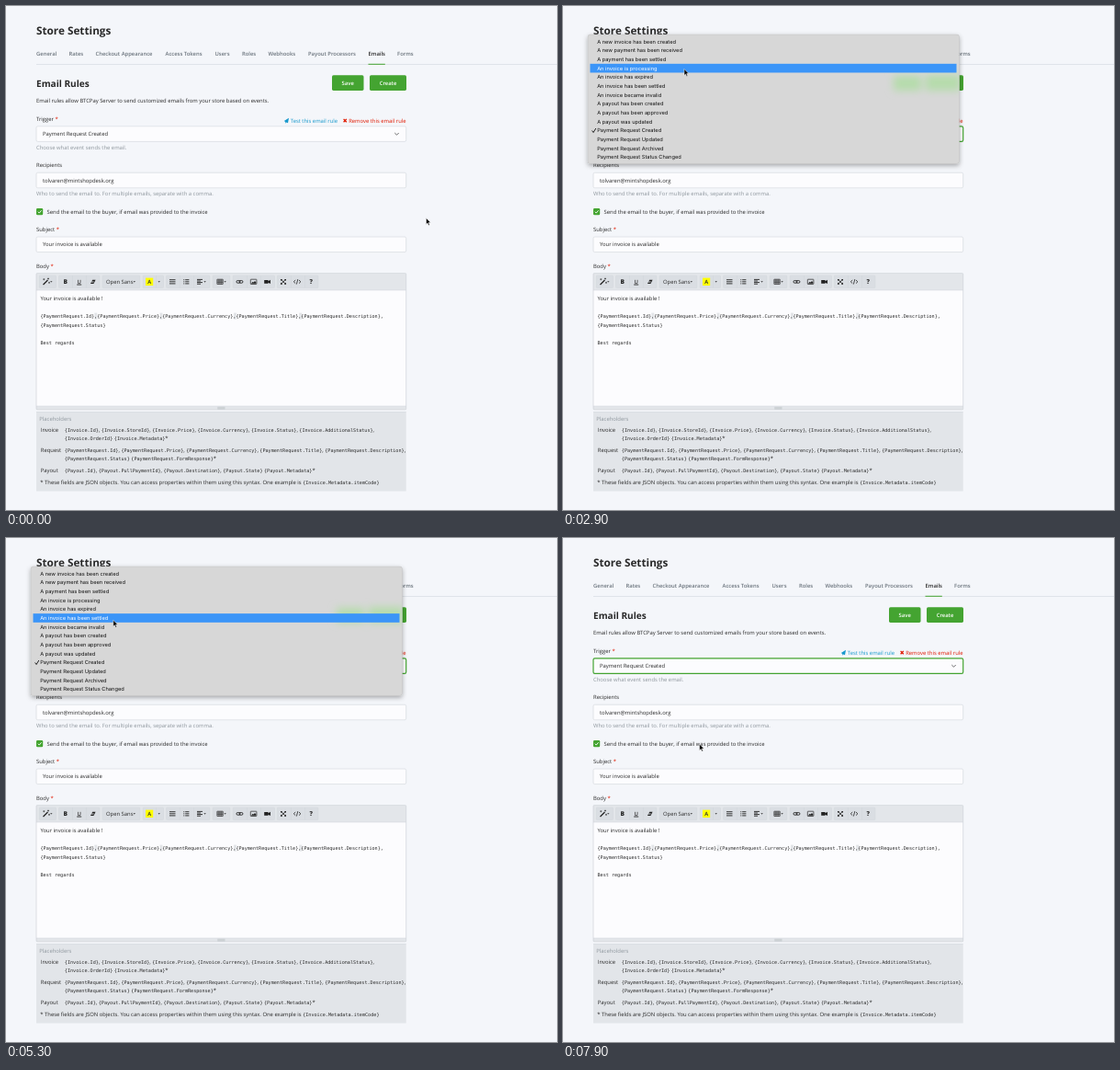
These frames come from a looping animation (600x548 px, 8000 ms). An HTML page:

```html
<!DOCTYPE html>
<html lang="en">
<head>
<meta charset="utf-8">
<title>Store Settings</title>
<style>
  html, body { margin: 0; width: 100%; height: 100%; overflow: hidden; background: #f4f6fa; }
  svg { display: block; }
  text { font: 5.88px "Open Sans", sans-serif; fill: #292929; text-rendering: geometricPrecision; white-space: pre; }
  .h1 { font-size: 11.76px; font-weight: 700; }
  .h2 { font-size: 10.08px; font-weight: 700; }
  .semi { font-weight: 600; }
  .tab { font-weight: 600; fill: #6b747d; }
  .help { fill: #8f979e; }
  .btn { font-weight: 600; fill: #fff; text-anchor: middle; }
  .code { font: 5.145px "DejaVu Sans Mono", monospace; }
  .item { font: 5.69px Inter, sans-serif; fill: #111; }
  .item.on { fill: #fff; }
  .field { fill: #fcfcfe; stroke: #d0d5db; stroke-width: .6; }
  .icon { fill: none; stroke: #222; stroke-width: .9; }
</style>
</head>
<body>
<svg id="stage" width="600" height="548" viewBox="0 0 600 548">
  <defs>
    <filter id="soft" x="-30%" y="-80%" width="160%" height="260%"><feGaussianBlur stdDeviation="4"/></filter>
    <filter id="shade" x="-5%" y="-10%" width="110%" height="125%">
      <feDropShadow dx="0" dy="2" stdDeviation="2.4" flood-color="#000" flood-opacity=".32"/>
    </filter>
    <clipPath id="menuClip"><rect x="27" y="31" width="404.5" height="140.5" rx="2.6"/></clipPath>
  </defs>
  <g id="page"></g>
  <g id="menu"></g>
  <path id="cursor" d="M0 0V6.9L1.55 5.5L2.6 7.9L3.8 7.4L2.75 5.05H4.9Z" fill="#000" stroke="#fff" stroke-width=".5"/>
</svg>
<script>
const $ = id => document.getElementById(id);
const out = [];
const add = s => out.push(s);
const rect = (x, y, w, h, attrs = '') => add(`<rect x="${x}" y="${y}" width="${w}" height="${h}" ${attrs}/>`);
const path = (d, attrs = 'class="icon"') => add(`<path d="${d}" ${attrs}/>`);
const label = (x, y, s, cls = '', attrs = '') => add(`<text x="${x}" y="${y}" class="${cls}" ${attrs}>${s}</text>`);
const withCode = s => s.replace(/\{[^}]+\}/g, m => `<tspan class="code">${m}</tspan>`);
const flush = id => { $(id).innerHTML = out.join(''); out.length = 0; };
const star = ' <tspan fill="#e11900">*</tspan>';
const green = '#44a431';

function header() {
  label(33, 31, 'Store Settings', 'h1');
  const tabs = [[33, 'General'], [68.5, 'Rates'], [97.5, 'Checkout Appearance'], [173.5, 'Access Tokens'],
    [227.5, 'Users'], [257, 'Roles'], [285.5, 'Webhooks'], [329, 'Payout Processors'], [394.5, 'Emails'], [426, 'Forms']];
  for (const [x, s] of tabs) label(x, 53.7, s, s === 'Emails' ? 'semi' : 'tab');
  rect(33, 63.2, 567, .6, 'fill="#d3d8de"');
  rect(394.5, 62.8, 18.3, 1, `fill="${green}"`);
  label(33, 88, 'Email Rules', 'h2');
  rect(355, 75.3, 34.5, 16.6, `rx="1.6" fill="${green}"`);
  rect(396, 75.3, 40, 16.6, `rx="1.6" fill="${green}"`);
  label(372.2, 85.7, 'Save', 'btn');
  label(416, 85.7, 'Create', 'btn');
  label(33, 105.4, 'Email rules allow BTCPay Server to send customized emails from your store based on events.');
}

function form() {
  const field = (y, s, id = '') => {
    rect(33, y, 402.7, 16.6, `rx="1.6" class="field" ${id}`);
    label(40, y + 10.3, s);
  };
  label(33, 125, 'Trigger' + star);
  path('M302.8 125L308 121.8L307 127.2L305.3 126.4L304.3 127.8V126Z', 'fill="#1698cc"');
  label(309.8, 126.7, 'Test this email rule', '', 'style="fill:#1698cc"');
  path('M367.6 122.9L370.8 126.3M370.8 122.9L367.6 126.3', 'stroke="#e11900" stroke-width="1.3"');
  label(373.2, 126.7, 'Remove this email rule', '', 'style="fill:#e11900"');
  field(130.8, 'Payment Request Created', 'id="trigger"');
  path('M423.3 138L425.5 140.2L427.7 138', 'fill="none" stroke="#444" stroke-width=".8"');
  label(33, 155.8, 'Choose what event sends the email.', 'help');
  label(33, 175.2, 'Recipients');
  field(181.2, 'tolvaren@mintshopdesk.org');
  label(33, 206.2, 'Who to send the email to. For multiple emails, separate with a comma.', 'help');
  rect(33, 220, 7.2, 7.2, `rx="1.2" fill="${green}"`);
  path('M34.8 223.7L36.2 225.1L38.6 222.3', 'fill="none" stroke="#fff" stroke-width=".9"');
  label(44.5, 225.7, 'Send the email to the buyer, if email was provided to the invoice');
  label(33, 245.2, 'Subject' + star);
  field(251, 'Your invoice is available');
  label(33, 284.6, 'Body' + star);
}

function toolbar() {
  rect(33, 290.6, 402.7, 18.4, 'fill="#e3e6ea"');
  const groups = [[36.3, 54.5], [57.5, 102], [105, 146], [149, 171.5], [174.5, 222], [225, 244], [247, 292.5], [295.3, 340]];
  for (const [a, b] of groups) rect(a, 293, b - a, 13.5, 'rx="1" fill="#dadee3" stroke="#cfd4da" stroke-width=".4"');
  for (const x of [72.3, 87.3, 163.3, 189.2, 204.2, 262.2, 277.3, 310.2, 325.2])
    rect(x, 293, .4, 13.5, 'fill="#cfd4da"');
  const caret = x => path(`M${x - 1.2} 299.3H${x + 1.2}L${x} 300.6Z`, 'fill="#222"');
  [49.3, 139.8, 166.7, 216.6, 238.6].forEach(caret);

  path('M40.5 303L45.5 298', 'stroke="#222" stroke-width="1.3"');
  path('M40.3 297.2H42.3M41.3 296.2V298.2M45 296.5H47M46 295.5V297.5M46 300.8H48M47 299.8V301.8', 'stroke="#222" stroke-width=".6"');
  label(64.7, 302.2, 'B', '', 'style="font-weight:800;font-size:6.6px" text-anchor="middle"');
  label(79.7, 301.8, 'U', 'semi', 'text-anchor="middle"');
  path('M77.2 303H82.2');
  path('M92 302L94.2 297.8H97.6L95.4 302Z', 'fill="#222"');
  path('M92.6 300.6L93.2 299.6H95.9L95.4 300.6Z', 'fill="#dadee3"');
  label(109, 301.9, 'Open Sans');
  rect(152, 295.6, 8.2, 8.4, 'fill="#ff0"');
  label(156.1, 302.2, 'A', 'semi', 'text-anchor="middle"');
  path('M178 297.7H184.5M178 299.8H184.5M178 301.9H184.5');
  path('M193.3 297.7H194.3M193.3 299.8H194.3M193.3 301.9H194.3M195.2 297.7H199.4M195.2 299.8H199.4M195.2 301.9H199.4');
  path('M208 297.4H214M208 299H212M208 300.6H214M208 302.2H212');
  path('M229.9 297.2H236.2V302.4H229.9ZM229.9 299H236.2M229.9 300.7H236.2M232 297.2V302.4M234.1 297.2V302.4', 'fill="none" stroke="#222" stroke-width=".7"');
  rect(251, 298.5, 4, 2.7, 'rx="1.3" class="icon"');
  rect(253.9, 298.5, 4, 2.7, 'rx="1.3" class="icon"');
  rect(266.3, 297.2, 6.6, 5.3, 'rx=".5" class="icon" style="stroke-width:.7"');
  path('M267 301.8L268.6 299.8L269.6 300.6L271 298.9L272.3 300.6V301.8Z', 'fill="#222"');
  path('M281.2 298H285.6V299.2L288 297.8V302L285.6 300.7V301.8H281.2Z', 'fill="#222"');
  path('M299.6 297.4L304.4 302.2M304.4 297.4L299.6 302.2');
  path('M299 296.9H301.2L299 299.1ZM305 296.9H302.8L305 299.1ZM299 302.7H301.2L299 300.5ZM305 302.7H302.8L305 300.5Z', 'fill="#222"');
  path('M315.2 298L313.3 299.8L315.2 301.6M319 298L320.9 299.8L319 301.6M317.8 297.1L316.4 302.5', 'fill="none" stroke="#222" stroke-width=".8"');
  label(332.2, 302.3, '?', '', 'style="font-weight:800;font-size:6.8px" text-anchor="middle"');
}

function editor() {
  rect(33, 290.6, 402.7, 148.3, 'fill="#fcfcfe"');
  toolbar();
  rect(33, 435, 402.7, 3.9, 'fill="#e3e6ea"');
  path('M230.3 436.2H238.5M230.3 437.2H238.5M230.3 438.2H238.5', 'stroke="#a5abb1" stroke-width=".4"');
  path('M33 309H435.7M33 435H435.7', 'stroke="#ced3d9" stroke-width=".5"');
  rect(33, 290.6, 402.7, 148.3, 'rx="1" fill="none" stroke="#c9ced4" stroke-width=".6"');
  for (const x of [96.3, 167.5, 248, 319.2]) rect(x, 333.6, 3, 7, 'fill="#e3e5e8"');
  label(37.5, 319.7, 'Your invoice is available !');
  const names = ['Id', 'Price', 'Currency', 'Title', 'Description'];
  label(37.5, 339, names.map(n => `{PaymentRequest.${n}},`).join(''), 'code');
  label(37.5, 348.5, '{PaymentRequest.Status}', 'code');
  label(37.5, 367.8, 'Best regards', 'code');
}

function placeholders() {
  rect(33, 441.2, 402.7, 86.3, 'fill="#e2e5e9"');
  rect(33, 441.2, 402.7, .5, 'fill="#d0d5da"');
  label(36.3, 451.2, 'Placeholders', 'help');
  const list = (kind, names) => names.split(' ').map(n => `{${kind}.${n}}`).join(', ');
  const row = (y, name, first, second) => {
    label(37.8, y, name);
    label(63.8, y, withCode(first));
    if (second) label(63.8, y + 9.4, withCode(second));
  };
  row(462.7, 'Invoice', list('Invoice', 'Id StoreId Price Currency Status AdditionalStatus') + ',', '{Invoice.OrderId} {Invoice.Metadata}*');
  row(485, 'Request', list('PaymentRequest', 'Id Price Currency Title Description') + ',', '{PaymentRequest.Status} {PaymentRequest.FormResponse}*');
  row(507.2, 'Payout', list('Payout', 'Id PullPaymentId Destination State') + ' {Payout.Metadata}*');
  label(37.3, 520.3, withCode('* These fields are JSON objects. You can access properties within them using this syntax. One example is {Invoice.Metadata.itemCode}'));
}

const items = ['A new invoice has been created', 'A new payment has been received', 'A payment has been settled',
  'An invoice is processing', 'An invoice has expired', 'An invoice has been settled', 'An invoice became invalid',
  'A payout has been created', 'A payout has been approved', 'A payout was updated', 'Payment Request Created',
  'Payment Request Updated', 'Payment Request Archived', 'Payment Request Status Changed'];
const menuTop = 33.8, pitch = 9.67;

function menu() {
  rect(27, 31, 404.5, 140.5, 'rx="2.6" fill="#d7d7d7" stroke="#b5b5b5" stroke-width=".4" filter="url(#shade)"');
  add('<g clip-path="url(#menuClip)"><g filter="url(#soft)" fill="#b5dcab">');
  rect(360, 76, 30, 16);
  rect(395, 75, 38, 17);
  add('</g></g>');
  rect(29.5, 0, 399, pitch, 'id="hilite" fill="#3b95f8"');
  items.forEach((s, i) => label(37.2, (menuTop + i * pitch + 6.9).toFixed(2), s, 'item'));
  path('M31.6 135.5L33.1 137.5L35.8 133', 'fill="none" stroke="#111" stroke-width=".9"');
}

header(); form(); editor(); placeholders(); flush('page');
menu(); flush('menu');

const loop = 8000, press = 1750, open = 1950, close = 7200, fade = 200;
// time, x, y of the pointer tip
const track = [[0, 457.5, 230.5], [750, 457.5, 230.5], [1650, 175.5, 144], [2050, 175.5, 144], [2600, 140, 73],
  [2900, 132, 68.5], [3300, 128, 57], [3700, 126, 37], [4100, 124.6, 43.6], [4600, 122, 37], [5300, 116.8, 89.3],
  [5700, 117, 76], [6150, 120, 90], [6700, 171.5, 200], [7150, 171.5, 200], [7850, 148.6, 224], [loop, 148.6, 224]];
const rows = [...document.querySelectorAll('.item')];

function pointer(t) {
  const i = track.findIndex(k => k[0] > t);
  const [a, b] = [track[i - 1], track[i]];
  const p = (t - a[0]) / (b[0] - a[0]);
  const e = p * p * (3 - 2 * p);
  return [a[1] + (b[1] - a[1]) * e, a[2] + (b[2] - a[2]) * e];
}

function draw(t) {
  const [x, y] = pointer(t);
  $('cursor').setAttribute('transform', `translate(${x} ${y})`);

  const focus = t >= press;
  $('trigger').style.stroke = focus ? green : '';
  $('trigger').style.strokeWidth = t >= open ? 1.2 : focus ? .7 : '';

  const shown = t >= open && t < close + fade;
  $('menu').style.display = shown ? '' : 'none';
  $('menu').style.opacity = t > close ? 1 - (t - close) / fade : 1;

  const active = Math.floor((y - menuTop) / pitch);
  const lit = active >= 0 && active < items.length;
  $('hilite').style.display = lit ? '' : 'none';
  $('hilite').setAttribute('y', menuTop + active * pitch);
  rows.forEach((r, i) => r.classList.toggle('on', i === active));
}

const start = performance.now();
function tick() {
  draw((performance.now() - start) % loop);
  requestAnimationFrame(tick);
}
tick();
</script>
</body>
</html>
```
